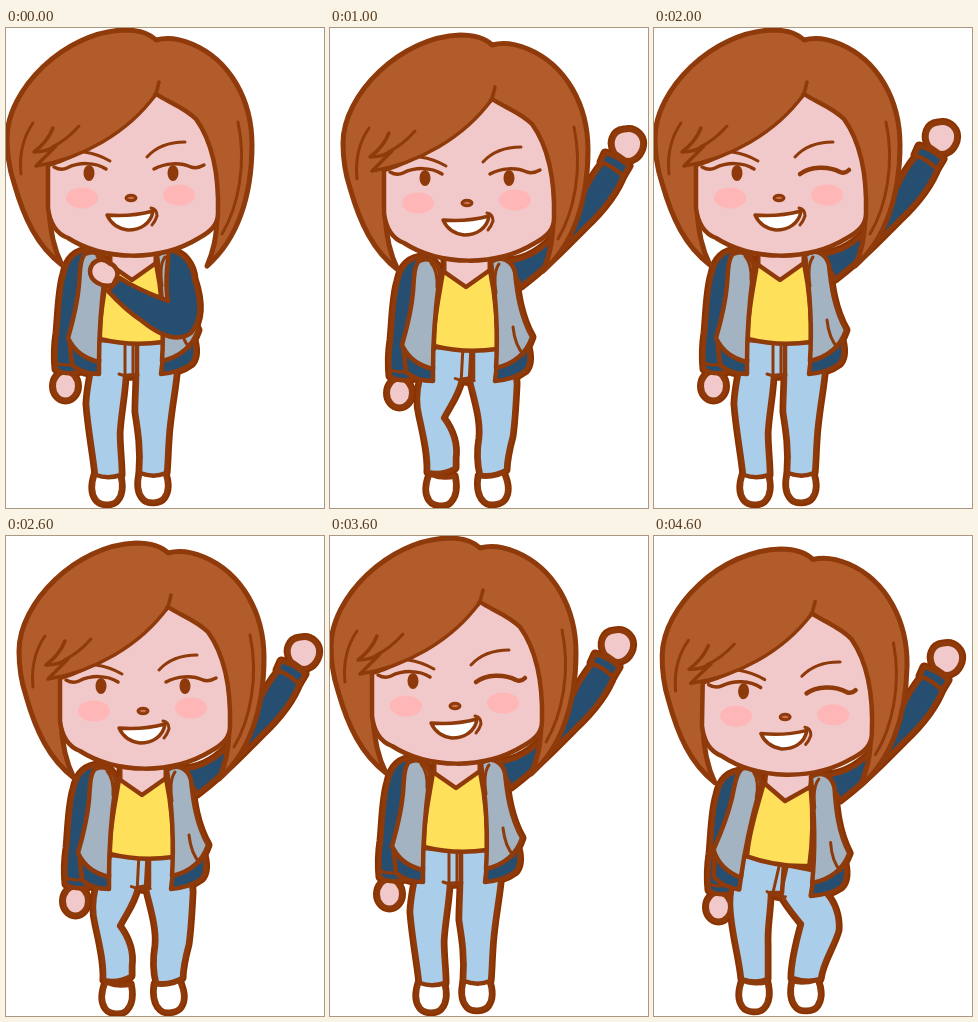
An HTML page that plays this animation: 318 by 480 pixels, repeating every 4.8 s.

```html
<!DOCTYPE html>
<html lang="en">
<head>
<meta charset="utf-8">
<title>Waving girl</title>
<style>
html, body { margin: 0; width: 100%; height: 100%; overflow: hidden; background: #fff; }
svg { display: block; width: 100vw; height: 100vh; }
path, ellipse { stroke: #8f3a0a; stroke-linecap: round; stroke-linejoin: round; }
.rim path, .rim ellipse { stroke: #8a3300; stroke-width: 9; }
</style>
</head>
<body>
<svg id="stage" viewBox="0 0 318 480"></svg>
<script>
const C = {
  line: '#8f3a0a', hair: '#b35c2b', skin: '#f2c9cb', cheek: '#feb6b6', navy: '#264e70',
  grey: '#a3b3c2', shirt: '#ffe05a', jeans: '#aacdea', white: '#fff'
};
const path = (d, fill = 'none', w = 4.5) => `<path d="${d}" fill="${fill}" stroke-width="${w}"/>`;
const oval = (x, y, rx, ry, fill, w = 4.5) =>
  `<ellipse cx="${x}" cy="${y}" rx="${rx}" ry="${ry}" fill="${fill}" stroke-width="${w}"/>`;
const group = (move, ...parts) => `<g transform="${move}">${parts.join('')}</g>`;
const shift = (x, y) => `translate(${x} ${y})`;

const shoe = (x, y, tilt) => group(`translate(${x} ${y}) rotate(${tilt})`,
  path('M-12 -14C-6 -11 6 -11 12 -14C15 -4 15 6 10 12C6 17 -6 17 -10 12C-15 6 -15 -4 -12 -14Z', C.white));

// Leg outlines, shoes and fly position for each stance.
const stances = {
  centre: {
    right: 'M122 314L159 314C165 322 169 334 170 346C168 366 163 390 162 412C161 425 161 436 160 445C151 449 142 448 134 445C136 422 133 403 130 384C130 371 131 359 131 348Z',
    left: 'M93 312L131 314L131 347L119 348C118 368 114 386 113 405C113 420 115 434 115 447C106 450 98 450 90 447C88 427 83 402 81 376C82 355 88 331 93 312Z',
    shoes: [[101, 460, 2], [147, 458, -3]], fly: [0, 0, 0]
  },
  right: {
    right: 'M132 320L171 321C180 331 186 343 186 356C185 376 184 393 182 408C178 423 176 433 176 442C167 447 159 448 151 447C148 435 148 422 150 410C152 392 145 371 140 350Z',
    left: 'M105 319L143 321L143 350L131 352C128 367 119 378 113 390C122 402 127 415 125 430L125 440C116 445 107 446 98 444C99 426 94 407 90 388C84 365 92 338 105 319Z',
    shoes: [[111, 461, 5], [163, 460, -8]], fly: [13, 5, 3]
  },
  left: {
    right: 'M122 327L158 334C163 342 166 352 173 359C180 367 185 380 184 394C180 410 168 425 166 443C157 446 147 445 138 442C138 428 142 410 148 388C140 378 132 369 126 357Z',
    left: 'M88 319L130 328L128 357L116 357C116 374 112 391 113 408L113 443C104 447 96 446 88 443C86 420 77 392 77 367C77 349 83 333 88 319Z',
    shoes: [[100, 459, 3], [152, 458, -4]], fly: [3, 12, 13]
  }
};

function legs(name) {
  const s = stances[name], [x, y, turn] = s.fly;
  return s.shoes.map(a => shoe(...a)).join('') + path(s.right, C.jeans) + path(s.left, C.jeans) +
    group(`translate(${x} ${y}) rotate(${turn} 122 332)`,
      path('M119 318V346M127 318V346M113 346Q123 350 132 347', 'none', 3));
}

const hangingArm =
  oval(59.5, 358, 12, 14, C.skin, 5) +
  path('M84 222C70 222 61 231 58 246C53 262 53 285 51 305C49 318 49 330 50 341C57 346 65 346 72 344C73 325 80 290 91 260Z', C.navy) +
  path('M50 335Q61 339 72 335', 'none', 3);

const raisedArm =
  path('M275 118C269 108 273 96 284 95C296 92 305 102 302 113C299 122 292 127 285 125Z', C.skin, 5) +
  path('M166 226C198 226 225 195 244 158C249 146 256 136 264 126L284 138C277 158 262 176 245 192C227 210 206 233 181 251Z', C.navy) +
  path('M265 118C274 120 282 125 289 131L283 141C277 135 269 130 261 127Z', C.navy);

const torso =
  path('M105 220L149 220L149 246L127 257L105 246Z', C.skin, 3) +
  path('M103 236L126 252L150 235C155 260 158 288 157 314C136 317 114 316 94 311C93 284 100 258 103 236Z', C.shirt);

const leftPanel =
  path('M63 308C70 322 81 329 93 331L93 346C82 346 74 344 66 337Z', C.navy) +
  path('M79 226C89 221 98 227 100 239C97 262 93 288 93 334C80 331 68 323 62 310C66 296 71 279 73 257C74 243 74 231 79 226Z', C.grey) +
  path('M91 228Q98 236 97 252', 'none', 3);

const rightPanel =
  path('M157 329C169 328 181 321 188 312C191 324 190 331 185 336C177 342 166 345 155 346Z', C.navy) +
  path('M151 227C161 220 172 225 175 237C177 257 180 281 192 302C186 320 173 329 156 333C158 302 157 270 151 227Z', C.grey) +
  path('M159 229Q153 237 156 258M173 292Q175 311 184 320', 'none', 3);

const foldedArm =
  path('M163 222C178 224 187 237 188 251C195 272 196 292 185 305C171 315 152 306 136 293C124 285 112 274 102 263L114 250C130 261 147 267 162 273C159 257 161 239 163 222Z', C.navy) +
  path('M112 250Q103 255 104 264M162 273L153 268', 'none', 3) +
  path('M107 257C96 260 84 253 84 243C85 233 96 228 103 235C109 237 113 243 111 249Z', C.skin);

const openEye =
  oval(167, 145, 4.5, 7, C.line, 2) +
  path('M148 141C159 135 174 134 185 139Q191 141 198 137', 'none', 3.5);
const winkEye = path('M146 146C156 138 175 138 186 144Q191 146 195 142', 'none', 4.5);

const head = wink =>
  path('M56 237C31 218 18 190 8 155C3 140 1 124 1 110C1 62 58 4 118 2C131 2 143 5 150 12C161 9 174 11 186 16C224 32 246 72 246 117C246 169 231 212 201 238C207 224 211 210 211 185L43 180C44 205 48 221 56 237Z', C.hair, 5) +
  path('M150 66C120 100 75 127 42 137L42 180C44 196 51 206 62 210C98 233 154 234 193 210C206 203 212 196 212 185C213 145 205 112 190 91C178 79 162 74 150 66Z', C.skin) +
  path('M47 100C43 110 36 118 28 124Q40 124 50 118L30 138C75 131 122 105 150 66L110 72Z', C.hair, 0) +
  path('M47 100C43 110 36 118 28 124Q40 124 50 118L30 138C75 131 122 105 150 66L153 54', 'none', 3.5) +
  path('M73 98C65 107 55 115 46 119M232 94C241 136 232 179 216 206M27 95C18 108 13 126 15 146', 'none', 3) +
  oval(76, 170, 16, 10.5, C.cheek, 0) + oval(173, 167, 16, 10.5, C.cheek, 0) +
  oval(83, 145, 4.5, 7, C.line, 2) +
  path('M48 139Q55 143 61 140C73 134 89 134 100 141', 'none', 3.5) +
  path('M78 124Q92 126 104 133M141 129C150 119 164 114 179 114', 'none', 3) +
  (wink ? winkEye : openEye) +
  oval(125, 170, 5, 2.7, '#cf6f50', 3) +
  path('M101 187Q125 189 147 183C145 196 134 202 122 202Q107 200 101 187Z', C.white, 3.5) +
  path('M145 180Q151 181 151 188Q149 194 146 197', 'none', 3);

// head: x, y, turn; body: x, y; lean: shirt, left panel, right panel; legs: stance, x, y
const upright = [0, 0, 0];
const centre = { head: [0, 0, 0], body: [0, 0], lean: upright, legs: ['centre', 0, 0] };
const right = { head: [12, 5, 0], body: [10, 7], lean: upright, legs: ['right', 0, 0] };
const left = { head: [7, 11, 1], body: [5, 13], lean: [6, 8, 2], legs: ['left', 0, 0] };
const dip = { head: [4, 6, 0], body: [3, 6], lean: upright, legs: ['centre', 2, 3] };
const nudge = { ...centre, head: [0, 1, 0] };

const steps = [
  { pose: centre, folded: true },
  { pose: nudge, folded: true },
  { pose: centre, wink: true },
  { pose: right, wink: true },
  { pose: left },
  { pose: right },
  { pose: dip, wink: true },
  { pose: left, wink: true }
];

function draw({ pose, folded, wink }) {
  const [hx, hy, ht] = pose.head, [bx, by] = pose.body, [stance, lx, ly] = pose.legs;
  const [shirtLean, leftLean, rightLean] = pose.lean;
  const turn = angle => `rotate(${angle} 126 252)`;
  const body =
    (folded ? '' : group(shift(bx, by), raisedArm)) +
    group(shift(bx, by), hangingArm) +
    group(shift(lx, ly), legs(stance)) +
    group(shift(bx, by),
      group(turn(shirtLean), torso),
      group(turn(leftLean), leftPanel),
      group(turn(rightLean), rightPanel),
      folded ? foldedArm : '');
  return `<g class="rim">${body}</g>${body}` +
    group(`translate(${hx} ${hy}) rotate(${ht} 125 120)`, head(wink));
}

const stage = document.getElementById('stage');
const views = steps.map(draw);
const stepTime = 200;
const start = performance.now();
let shown = -1;

function tick() {
  const i = Math.floor((performance.now() - start) / stepTime) % views.length;
  if (i !== shown) stage.innerHTML = views[shown = i];
  requestAnimationFrame(tick);
}
tick();
</script>
</body>
</html>
```
